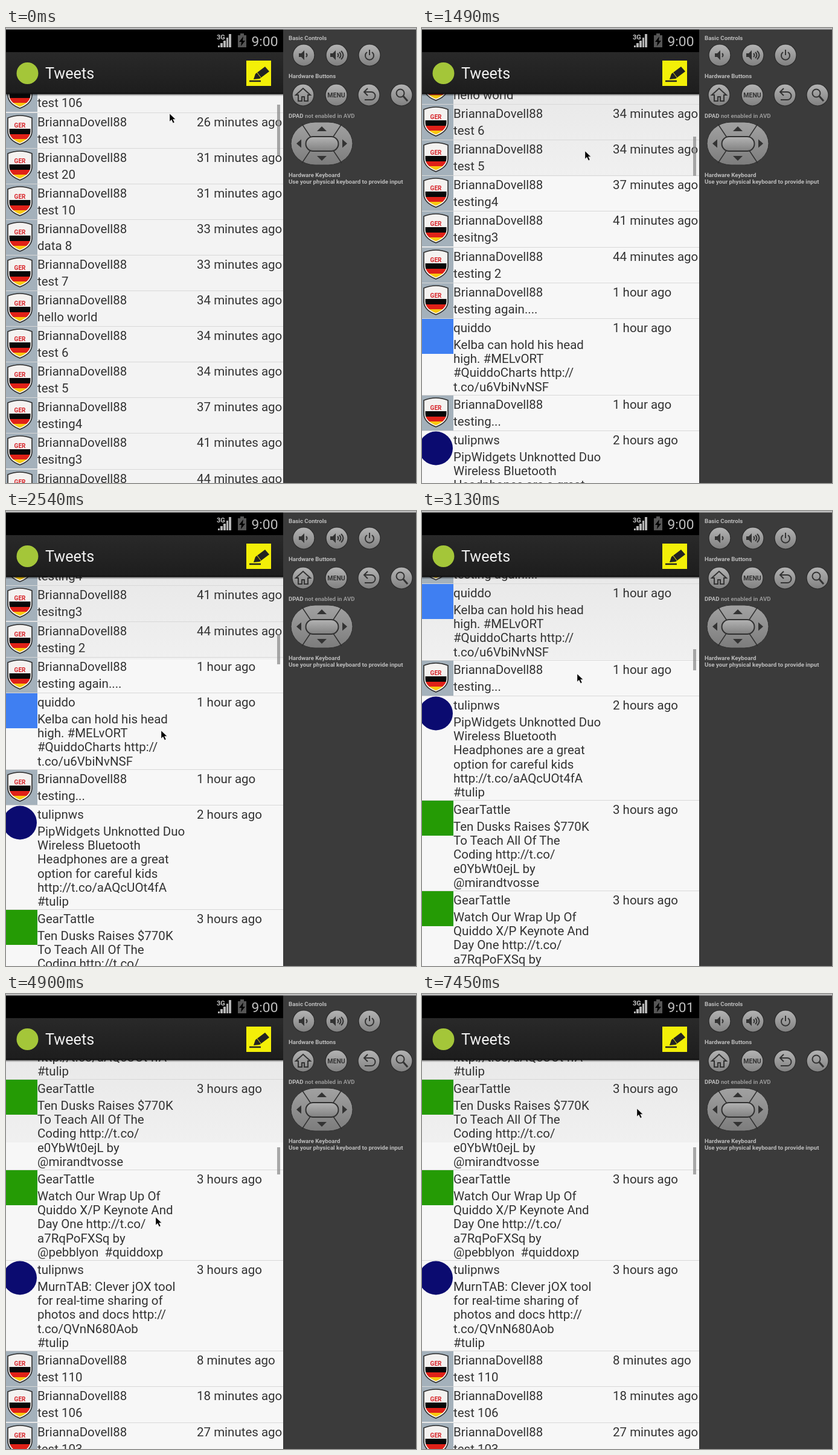
Recreate the animation shown at these times as an HTML page. Size 679 by 754 pixels, loop 8 s.

```html
<!DOCTYPE html>
<html lang="en">
<head>
<meta charset="utf-8">
<style>
  html, body { margin: 0; width: 100%; height: 100%; overflow: hidden; background: #3b3b3b; }
  svg { display: block; width: 679px; height: 754px; }
  text { font-family: Roboto, sans-serif; white-space: pre; }
  #list text { font-size: 20.5px; fill: #333; }
  .ger { font-size: 10px; font-weight: bold; fill: #d8262b; text-anchor: middle; }
  .label text { font-size: 9.68px; font-weight: bold; fill: #bcbcbc; }
  .line { fill: none; stroke: #333; stroke-width: 2; }
</style>
</head>
<body>
<svg viewBox="0 0 679 754">
  <defs>
    <linearGradient id="bar" x2="0" y2="1"><stop stop-color="#292929"/><stop offset="1" stop-color="#1d1d1d"/></linearGradient>
    <linearGradient id="paper" x2="0" y2="1"><stop stop-color="#e9e9e9"/><stop offset="1" stop-color="#f0f0f0"/></linearGradient>
    <linearGradient id="shade" x2="0" y2="1"><stop stop-color="#000" stop-opacity=".55"/><stop offset="1" stop-color="#000" stop-opacity="0"/></linearGradient>
    <linearGradient id="metal" x2="0" y2="1"><stop stop-color="#b4b4b4"/><stop offset="1" stop-color="#808080"/></linearGradient>
    <linearGradient id="pad" x2="0" y2="1"><stop stop-color="#a2a2a2"/><stop offset="1" stop-color="#7c7c7c"/></linearGradient>
    <clipPath id="window"><path d="M0 109H459V754H0z"/></clipPath>
    <path id="shield" d="M3 9Q23 1 43 9V32Q42 46 23 53Q4 46 3 32z"/>
    <clipPath id="crest"><use href="#shield"/></clipPath>
    <g id="badge">
      <path d="M0 1H52V59H0z" fill="#a4b1bb"/>
      <g clip-path="url(#crest)">
        <path d="M0 0H52V28H0z" fill="#f4f2f0"/>
        <path d="M0 27H52V36H0z" fill="#080808"/>
        <path d="M0 36H52V44H0z" fill="#e02118"/>
        <path d="M0 44H52V56H0z" fill="#f8c811"/>
        <use href="#shield" fill="none" stroke="#f4f2f0" stroke-width="5"/>
      </g>
      <use href="#shield" fill="none" stroke="#2b2b2b" stroke-width="1.6"/>
      <text class="ger" x="23" y="24.5">GER</text>
    </g>
    <path id="blue" d="M0 1H52V59H0z" fill="#3f7ff2"/>
    <path id="green" d="M0 1H52V59H0z" fill="#259b05"/>
    <circle id="navy" cx="23" cy="29.5" r="28" fill="#0b0b70"/>
  </defs>

  <g clip-path="url(#window)">
    <path id="back" d="M0 109H459V754H0z"/>
    <path id="top" d="M0 109H459V246H0z" fill="url(#paper)"/>
    <g id="list"></g>
    <rect id="thumb" x="449" width="5" fill="#888" fill-opacity=".72"/>
    <path d="M0 109H459V113H0z" fill="url(#shade)"/>
  </g>

  <path d="M0 0H459V40H0z"/>
  <path d="M0 40H459V109H0z" fill="url(#bar)"/>
  <path d="M0 107.5H459V109.5H0z" fill="#111"/>
  <text x="349" y="19" font-size="11" font-weight="bold" fill="#c4c4c4">3G</text>
  <path d="M351 32v-3h3v3zM355 32v-7h4v7zM360 32v-11h4v11zM365 32v-16h3v16zM369 32v-22h4v22z" fill="#b5b5b5"/>
  <path d="M388 9h6v3h4v20h-14v-20h4z" fill="#555"/>
  <path d="M393 14l-7 9h4l-1 7 7-9h-4z"/>
  <text id="clock" x="406.5" y="30" font-size="22.8" fill="#bebebe"></text>
  <circle cx="35.5" cy="75" r="18" fill="#a4c639"/>
  <text x="65" y="84" font-size="25.2" fill="#f2f2f2">Tweets</text>
  <path d="M398 54H439V96H398z" fill="#f3ef08"/>
  <path d="M410 85l3-9 16-12 7 8-16 12z" fill="#222"/>
  <path d="M416 74l6 8" stroke="#f3ef08"/>
  <path d="M403 88h19" stroke="#222" stroke-width="2.500"/>

  <path d="M459 0H679V754H459z" fill="#3b3b3b"/>
  <path d="M0 0H679V2.5H0z" fill="#bdbdbd"/>
  <g class="label">
    <text x="468" y="20">Basic Controls</text>
    <text x="468" y="83">Hardware Buttons</text>
    <text x="468" y="149">DPAD<tspan fill="#989898"> not enabled in AVD</tspan></text>
    <text x="468" y="247">Hardware Keyboard</text>
    <text x="468" y="257.7">Use your physical keyboard to provide input</text>
  </g>
  <g id="buttons"></g>
  <g stroke="#303030">
    <rect x="472" y="156" width="102" height="71" rx="40" ry="35.5" fill="url(#pad)"/>
    <path d="M490 159l16 24M556 159l-16 24M490 224l16 -24M556 224l-16 -24" stroke-width="1.5"/>
    <rect x="496.5" y="180" width="54" height="24" rx="12" fill="url(#metal)" stroke-width="2"/>
    <path d="M523 163l8 8h-16zM523 220l8 -8h-16zM481 191.500l8 -7v14zM565 191.500l-8 -7v14z" fill="#333" stroke="none"/>
  </g>
  <path id="cursor" d="M0 0v13l3-3 2.700 5.500 2.300-1-2.500-5.200h4.200z" stroke="#fff" stroke-opacity=".7" stroke-width=".6"/>
</svg>

<script>
const $ = id => document.getElementById(id);

// Each row: icon and account, age, then the lines of its message.
const USER = ['badge', 'BriannaDovell88'];
const SEARCH = ['blue', 'quiddo'];
const NEWS = ['navy', 'tulipnws'];
const TECH = ['green', 'GearTattle'];
const rows = [
  [USER, '8 minutes ago', 'test 110'],
  [USER, '18 minutes ago', 'test 106'],
  [USER, '26 minutes ago', 'test 103'],
  [USER, '31 minutes ago', 'test 20'],
  [USER, '31 minutes ago', 'test 10'],
  [USER, '33 minutes ago', 'data 8'],
  [USER, '33 minutes ago', 'test 7'],
  [USER, '34 minutes ago', 'hello world'],
  [USER, '34 minutes ago', 'test 6'],
  [USER, '34 minutes ago', 'test 5'],
  [USER, '37 minutes ago', 'testing4'],
  [USER, '41 minutes ago', 'tesitng3'],
  [USER, '44 minutes ago', 'testing 2'],
  [USER, '1 hour ago', 'testing again....'],
  [SEARCH, '1 hour ago', 'Kelba can hold his head', 'high. #MELvORT', '#QuiddoCharts http://', 't.co/u6VbiNvNSF'],
  [USER, '1 hour ago', 'testing...'],
  [NEWS, '2 hours ago', 'PipWidgets Unknotted Duo', 'Wireless Bluetooth', 'Headphones are a great', 'option for careful kids', 'http://t.co/aAQcUOt4fA', '#tulip'],
  [TECH, '3 hours ago', 'Ten Dusks Raises $770K', 'To Teach All Of The', 'Coding http://t.co/', 'e0YbWt0ejL by', '@mirandtvosse'],
  [TECH, '3 hours ago', 'Watch Our Wrap Up Of', 'Quiddo X/P Keynote And', 'Day One http://t.co/', 'a7RqPoFXSq by', '@pebblyon  #quiddoxp'],
  [NEWS, '3 hours ago', 'MurnTAB: Clever jOX tool', 'for real-time sharing of', 'photos and docs http://', 't.co/QVnN680Aob', '#tulip'],
  [USER, '8 minutes ago', 'test 110'],
  [USER, '18 minutes ago', 'test 106'],
  [USER, '27 minutes ago', 'test 103'],
];
const ROW = 59.1, LINE = 23.2;

const text = (x, y, s) => `<text x="${x}" y="${Math.round(y)}">${s}</text>`;
let rowTop = 140.01 - 2 * ROW;
$('list').innerHTML = rows.map(([[icon, name], age, ...lines]) => {
  const y = Math.floor(rowTop);
  rowTop += Math.max(ROW, 34.1 + LINE * lines.length);
  return `<g transform="translate(0 ${y})"><path d="M0 0H459V1H0z" fill="#d8d8d8"/><use href="#${icon}"/>` +
    text(52, 23, name) + text(316, 23, age) +
    lines.map((s, i) => text(52, 51 + i * LINE, s)).join('') + '</g>';
}).join('');

const speaker = '<path d="M-8 -3h4l5 -5v16l-5 -5h-4z" fill="#333"/>';
const wave = (x, r) => `<path class="line" d="M${x} ${-r}q${r} ${r} 0 ${2 * r}"/>`;
const buttons = [
  [493, 45, speaker + wave(4, 3)],
  [548, 45, `<g transform="translate(-3 0)">${speaker + wave(4, 3) + wave(7, 5) + wave(10, 7)}</g>`],
  [602, 45, '<path class="line" d="M-4 -5a7 7 0 1 0 8 0M0 -9v9"/>'],
  [492, 111, '<path class="line" d="M-12 0L0 -11L12 0H8V10H2V3H-2V10H-8V0z"/>'],
  [547, 111, '<text y="4" font-size="10.5" font-weight="bold" fill="#333" text-anchor="middle">MENU</text>'],
  [601, 111, '<path class="line" d="M-2 -11l-6 6l6 6M-8 -5H4a6 6 0 0 1 0 13H-7"/>'],
  [655, 111, '<circle class="line" cx="-2" cy="-3" r="6.500"/><path class="line" d="M3 2l7 8" style="stroke-width:3"/>'],
];
$('buttons').innerHTML = buttons.map(([x, y, icon]) =>
  `<g transform="translate(${x} ${y})"><circle r="18" fill="url(#metal)" stroke="#2c2c2c" stroke-width="1.2"/>${icon}</g>`).join('');

// Linear interpolation through [position, ...values] keys.
function track(keys, at) {
  const n = keys.findIndex(k => k[0] > at);
  if (n < 0) return keys.at(-1).slice(1);
  const a = keys[n - 1], b = keys[n], u = (at - a[0]) / (b[0] - a[0]);
  return a.slice(1).map((v, i) => v + (b[i + 1] - v) * u);
}

// Motion keys are in ticks; the screen only refreshes once per tick.
const TICK = 148.4;
const scrollKeys = [[0, 0], [1, 8], [7, 8], [8, 60], [10, 368], [11, 420], [12, 448], [14, 466],
  [15, 468], [16, 485], [17, 548], [18, 640], [19, 690], [20, 717], [21, 729], [23, 737],
  [24, 738], [26, 775], [27, 807], [28, 945], [29, 1030], [30, 1067]];
const cursorKeys = [[0, 271, 142], [3, 271, 142], [4, 266, 290], [5, 260, 400], [6, 259, 438],
  [7, 259, 438], [8, 261, 385], [9, 270, 204], [12, 270, 204], [14, 260, 400], [15, 257, 440],
  [16, 257, 424], [17, 257, 364], [18, 257, 270], [21, 257, 270], [23, 248, 450], [24, 248, 446],
  [27, 248, 370], [48, 248, 370], [50, 356, 190]];
const thumbKeys = [[0, 127, 84], [368, 180, 65], [548, 204, 50], [729, 229, 35], [807, 235, 33], [1067, 254, 45]];

function draw() {
  const t = performance.now() % 8000, tick = Math.floor(t / TICK);
  const [scroll] = track(scrollKeys, tick).map(Math.round);
  const [x, y] = track(cursorKeys, tick).map(Math.round);
  const [thumbY, thumbH] = track(thumbKeys, scroll);
  $('list').setAttribute('transform', `translate(0 ${-scroll})`);
  $('cursor').setAttribute('transform', `translate(${x} ${y})`);
  $('thumb').setAttribute('y', thumbY);
  $('thumb').setAttribute('height', thumbH);
  $('back').setAttribute('fill', tick ? '#f7f7f7' : '#f3f3f3');
  $('top').setAttribute('visibility', tick ? 'visible' : 'hidden');
  $('clock').textContent = t < 6850 ? '9:00' : '9:01';
  requestAnimationFrame(draw);
}
draw();
</script>
</body>
</html>
```
